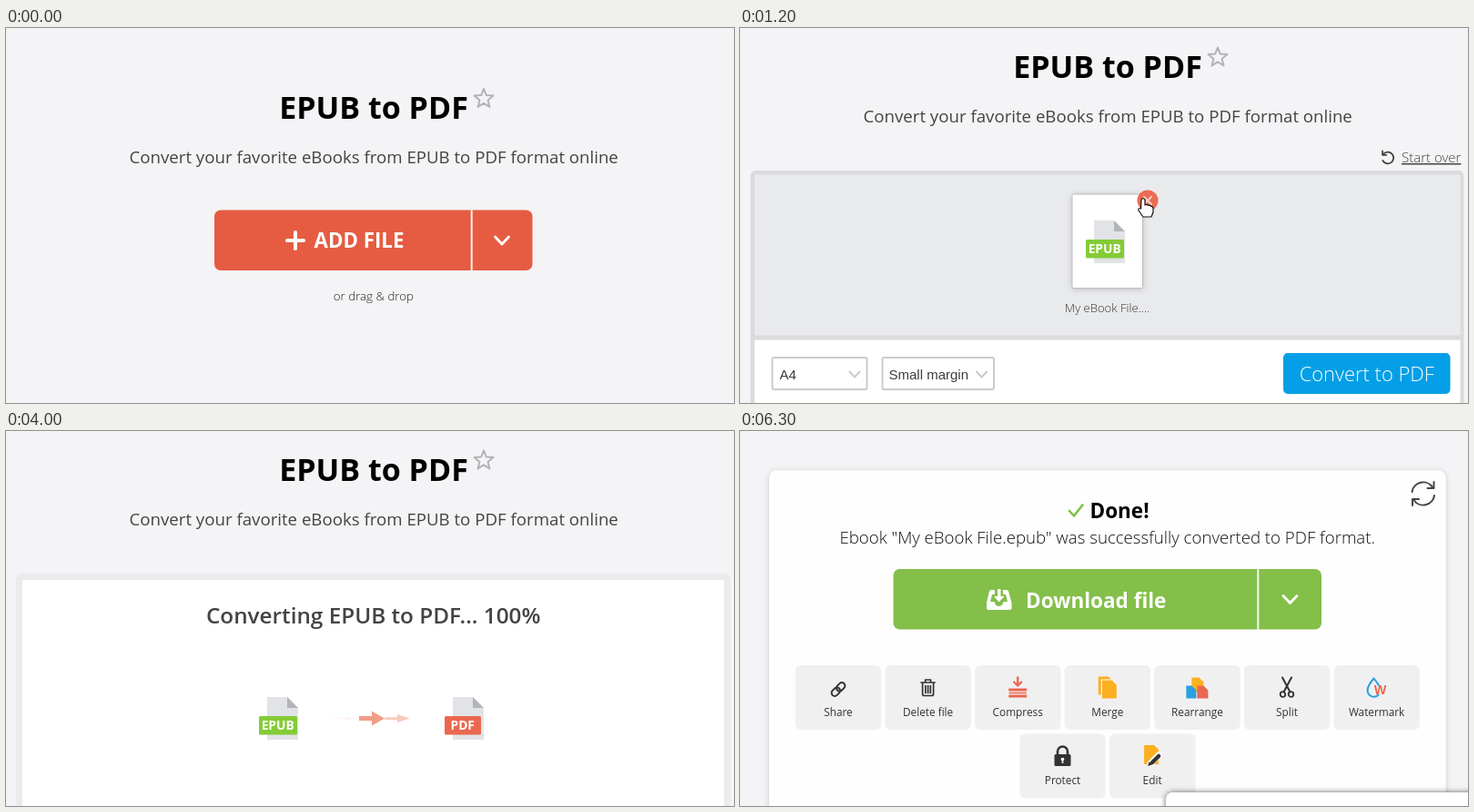
These frames come from a looping animation (800 by 413 pixels, 6500 ms). An HTML page:

```html
<!DOCTYPE html>
<html lang="en">
<head>
<meta charset="utf-8">
<title>EPUB to PDF</title>
<style>
  html, body { margin: 0; width: 100%; height: 100%; overflow: hidden; background: #f4f3f5; }
  svg { display: block; width: 100vw; height: 100vh; }
  text { font-family: "Open Sans", sans-serif; text-anchor: middle; }
  .left { text-anchor: start; }
  .bold { font-weight: 700; }
  .light { font-weight: 300; }
  .ui { font-family: "Liberation Sans", Arial, sans-serif; font-size: 15px; fill: #3c3c3c; text-anchor: start; }
  .line { fill: none; stroke-linecap: round; stroke-linejoin: round; }
  .label { font-size: 11.8px; fill: #333; }
</style>
</head>
<body>
<svg viewBox="0 0 800 413">
  <defs>
    <linearGradient id="ghostFill" x1="0" y1="0" x2="0" y2="1">
      <stop offset="0" stop-color="#a6b4c0"/>
      <stop offset=".5" stop-color="#9eafb8"/>
      <stop offset="1" stop-color="#9badbc"/>
    </linearGradient>
    <filter id="soft" x="-20%" y="-20%" width="140%" height="140%">
      <feDropShadow dx="0" dy="1" stdDeviation="3" flood-opacity=".18"/>
    </filter>
    <filter id="deep" x="-10%" y="-40%" width="120%" height="180%">
      <feDropShadow dx="0" dy="0" stdDeviation="3" flood-opacity=".6"/>
    </filter>
    <filter id="haze" filterUnits="userSpaceOnUse" x="-50" y="-50" width="900" height="560" color-interpolation-filters="sRGB">
      <feGaussianBlur id="blur" stdDeviation="0"/>
    </filter>
    <path id="doc" d="M0 0H22L34 12V47H0Z" fill="#e1e3e6"/>
    <path id="fold" d="M22 0V12H34Z" fill="#b1b5b9"/>
    <path id="chevron" class="line" d="M-7.5 -4L0 4L7.5 -4"/>
    <path id="caret" class="line" d="M-5.5 -3L0 3L5.5 -3"/>
    <g id="epubIcon">
      <use href="#doc" x="9"/><use href="#fold" x="9"/>
      <rect y="21" width="42" height="20.5" rx="1.5" fill="#84cb35"/>
      <text class="bold" x="20.7" y="36.3" font-size="13.8" fill="#fff">EPUB</text>
    </g>
    <g id="pdfIcon">
      <use href="#doc" x="9"/><use href="#fold" x="9"/>
      <rect y="21" width="40" height="20.5" rx="1.5" fill="#eb6850"/>
      <text class="bold" x="19.7" y="36.3" font-size="13.8" fill="#fff">PDF</text>
    </g>
  </defs>

  <rect width="800" height="413" fill="#f4f3f5"/>

  <g id="header">
    <text class="bold" x="404" y="100" font-size="34">EPUB to PDF</text>
    <path id="star" class="line" stroke="#b3b2b6" stroke-width="2"/>
    <text x="404.2" y="149" font-size="18.65" fill="#444">Convert your favorite eBooks from EPUB to PDF format online</text>
  </g>

  <g id="start">
    <rect x="229" y="200.5" width="349.5" height="66.5" rx="7" fill="#e65c42"/>
    <rect x="510.7" y="200.5" width="2" height="66.5" fill="#fbeeea"/>
    <path class="line" d="M309 234H327M318 225V243" stroke="#fff" stroke-width="4"/>
    <text class="bold" x="388" y="242" font-size="22.3" fill="#fff">ADD FILE</text>
    <use href="#chevron" x="545" y="234" stroke="#fff" stroke-width="2.8"/>
    <text class="light" x="403.9" y="300" font-size="13.3" fill="#222">or drag &amp; drop</text>
  </g>

  <g id="overlay">
    <rect width="800" height="413" opacity=".49"/>
    <text class="bold" x="418.3" y="36" font-size="22.5" fill="#fff">Drop the file(s) here</text>
  </g>

  <g id="setup">
    <path class="line" d="M707 139A6.3 6.3 0 1 1 706.3 146M706 135.5V139.8H710.3" stroke="#444" stroke-width="1.8"/>
    <text class="light" x="759.7" y="148" font-size="15" fill="#444" text-decoration="underline">Start over</text>
    <rect x="11.5" y="157" width="784" height="300" rx="6" fill="#dbdbdd"/>
    <rect x="16" y="161.5" width="775.5" height="177" rx="2" fill="#e9eaec"/>
    <rect x="16" y="343.5" width="775.5" height="90" fill="#fff"/>
    <rect x="365" y="183" width="77.5" height="103.5" rx="1" fill="#fff" stroke="#bcbcc2" filter="url(#soft)"/>
    <use href="#epubIcon" x="380" y="212"/>
    <text class="light" x="403.5" y="312.5" font-size="13.1" fill="#333">My eBook File....</text>
    <g id="remove">
      <circle cx="448" cy="190" r="11.5" fill="#ec6b53"/>
      <path class="line" d="M444 186L452 194M452 186L444 194" stroke="#fbd5cc" stroke-width="1.8"/>
    </g>
    <g fill="#fff" stroke="#c9cbd1" stroke-width="2">
      <rect x="35.5" y="363" width="104" height="35" rx="2"/>
      <rect x="156.5" y="363" width="122.5" height="35" rx="2"/>
      <use href="#caret" x="126" y="381.5"/>
      <use href="#caret" x="265.5" y="381.5"/>
    </g>
    <text class="ui" x="43.5" y="387">A4</text>
    <text class="ui" x="163.5" y="387">Small margin</text>
    <rect id="convert" x="597" y="358" width="183.5" height="45" rx="5"/>
    <text class="light" x="688.7" y="388.5" font-size="21.9" fill="#fff">Convert to PDF</text>
  </g>

  <g id="working">
    <rect x="11" y="157" width="785.5" height="300" rx="6" fill="#ebebee"/>
    <rect x="18" y="164" width="771" height="260" fill="#fff"/>
    <text id="status" x="403.7" y="212" font-size="24.3" font-weight="600" fill="#434345"></text>
    <use href="#epubIcon" x="278" y="293"/>
    <use href="#pdfIcon" x="482" y="293"/>
    <g id="arrows" fill="#f0937b"></g>
  </g>

  <g id="done">
    <rect x="32" y="43.5" width="743.5" height="400" rx="8" fill="#fefefe" filter="url(#soft)"/>
    <path class="line" d="M738.5 67A12.3 12.3 0 0 1 761 62M763 71A12.3 12.3 0 0 1 740.5 76M762.5 56V63H755.5M739 82V75H746" stroke="#444" stroke-width="2"/>
    <path class="line" d="M362 88L367 93.5L376.5 81.5" stroke="#7cc142" stroke-width="2.6"/>
    <text class="bold left" x="384.5" y="96" font-size="22.5">Done!</text>
    <text class="light" x="403.7" y="124" font-size="18.65" fill="#111">Ebook "My eBook File.epub" was successfully converted to PDF format.</text>
    <rect x="168.5" y="152" width="470.5" height="66.5" rx="7" fill="#83bf49"/>
    <rect x="568.3" y="152" width="2" height="66.5" fill="#f2f8ec"/>
    <path d="M276 175H280V180H277L275 188H279.5Q280.5 193 284.5 193T289.5 188H294L292 180H289V175H293Q294.5 175 295 176.5L298.5 189V195Q298.5 197 296.5 197H273Q271 197 271 195V189L274 176.5Q274.5 175 276 175Z" fill="#fff"/>
    <path d="M283 174H286.5V182H290.5L284.7 188.5L279 182H283Z" fill="#fff"/>
    <text class="bold left" x="314" y="195" font-size="22.5" fill="#fff">Download file</text>
    <use href="#chevron" x="604.5" y="185.5" stroke="#fff" stroke-width="2.8"/>
    <g id="tiles"></g>
  </g>
  <rect id="sheet" x="468" width="360" height="60" rx="8" fill="#fff" filter="url(#deep)"/>

  <g id="ghost">
    <rect x="-29" y="-85" width="97" height="97" rx="2" fill="#222" opacity=".25"/>
    <rect x="-30" y="-87" width="96" height="96.5" rx="2" fill="url(#ghostFill)" stroke="#b5c2ca" opacity=".82"/>
    <rect x="29" y="12" width="51" height="17" fill="#fff" stroke="#d0d0d6" stroke-width=".6"/>
    <path class="line" d="M32 20.5H41M37 16.5L41 20.5L37 24.5" stroke="#2a4fa8" stroke-width="1.3"/>
    <text class="left" x="46.5" y="24.7" font-size="11" fill="#26367c">Move</text>
  </g>
  <path id="pointer" d="M0 0V15.5L3.6 12.2L6.2 18L8.7 16.9L6.2 11.2H11Z" fill="#fff" stroke="#111" stroke-linejoin="round"/>
  <path id="hand" d="M-2 0Q0 -2.5 2 0V6Q4 4.5 5.5 6.5Q7.5 5.5 8.5 7.5Q10.5 7 11 9.5V14L9 19H0L-5 12Q-6 9 -2.5 10Z" fill="#fff" stroke="#111" stroke-width="1.2" stroke-linejoin="round"/>
</svg>

<script>
const LOOP = 6500, STEP = 100;
// Start of each scene, in ms.
const DRAG = 700, SETUP = 1200, WORK = 2600, COMPLETE = 4000, DONE = 5100;

const $ = id => document.getElementById(id);
const show = (id, on) => { $(id).style.display = on ? '' : 'none'; };
const place = (id, x, y) => $(id).setAttribute('transform', `translate(${x} ${y})`);
const smooth = k => k * k * (3 - 2 * k);

// Value at x in a table of [x, value] rows.
function along(rows, x, ease = k => k) {
  if (x <= rows[0][0]) return rows[0][1];
  for (let i = 1; i < rows.length; i++) {
    const [x0, a] = rows[i - 1], [x1, b] = rows[i];
    if (x <= x1) return a + (b - a) * ease((x - x0) / (x1 - x0));
  }
  return rows[rows.length - 1][1];
}

const cursorX = [[DRAG, 666], [1100, 443], [SETUP, 443], [2000, 686], [2300, 682]];
const cursorY = [[DRAG, 187], [1100, 189], [SETUP, 189], [2000, 369], [2300, 387]];
const blurSize = [[DONE, 7], [5500, 0]];
const sheetTop = [[5200, 420], [5500, 398]];
const pulse = [[-.4, 0], [-.2, .55], [0, 1], [.2, .15], [.4, .05], [.5, 0]];

const star = Array.from({ length: 10 }, (_, i) => {
  const r = i % 2 ? 4.8 : 11, a = i * Math.PI / 5;
  return `${525 + r * Math.sin(a)} ${78 - r * Math.cos(a)}`;
});
$('star').setAttribute('d', `M${star.join('L')}Z`);

// Icons are drawn around 0,0.
const stroke = (d, color = '#333', w = 2) =>
  `<path class="line" d="${d}" stroke="${color}" stroke-width="${w}"/>`;
const page = (x, y, w, h, color) =>
  `<path d="M${x} ${y}h${w - 5}l5 5v${h - 5}h${-w}Z" fill="${color}"/>`;
const YELLOW = '#fbb01f', RED = '#eb6850', BLUE = '#2aa0e0';

const tools = [
  ['Share', `<g transform="translate(0 2) rotate(-45)" class="line" stroke="#333" stroke-width="2">
    <rect x="-9" y="-3.5" width="10.5" height="7" rx="3.5"/><rect x="-1.5" y="-3.5" width="10.5" height="7" rx="3.5"/></g>`],
  ['Delete file', stroke('M-7.5 -5.5H7.5M-3 -6V-8.5H3V-6M-6 -5V7Q-6 9 -4 9H4Q6 9 6 7V-5M-2.7 -2V6M0 -2V6M2.7 -2V6', '#333', 1.7)],
  ['Compress', stroke('M0 -11V-3M-4 -6L0 -2L4 -6', RED, 2.4) +
    `<path d="M-10 1H10V4H-10ZM-10 8H10V11H-10Z" fill="${RED}"/>` + stroke('M-9 6H9', RED, 1.5)],
  ['Merge', page(-10, -12, 16, 20, YELLOW) + page(-7, -9, 17, 20, '#fff') + page(-6, -8, 16, 20, YELLOW)],
  ['Rearrange', page(-6, -11, 13, 16, YELLOW) + page(-12, -2, 11, 14, BLUE) + page(0, -2, 12, 14, RED)],
  ['Split', stroke('M-5 -11L3.5 5M5 -11L-3.5 5') +
    '<g class="line" stroke="#333" stroke-width="1.8"><circle cx="-4.5" cy="7.5" r="2.8"/><circle cx="4.5" cy="7.5" r="2.8"/></g>'],
  ['Watermark', stroke('M-3 -10Q-10 -2 -10 3A7 7 0 0 0 2 8M-3 -10Q1 -5 2.5 -2', BLUE) +
    `<text class="bold" x="4" y="7" font-size="14" fill="${RED}">W</text>`],
  ['Protect', stroke('M-5.5 -1V-5A5.5 5.5 0 0 1 5.5 -5V-1', '#333', 2.6) +
    '<rect x="-9" y="-2" width="18" height="13" rx="1.5" fill="#333"/><circle cy="3.5" r="1.8" fill="#fff"/><path d="M-.8 4H.8V8H-.8Z" fill="#fff"/>'],
  ['Edit', page(-9, -12, 16, 21, YELLOW) + stroke('M-2 8L7 -1', '#fff', 7) +
    stroke('M0 7L7 0', '#333', 4.5) + '<path d="M-5 11L-3.5 6L0 9.5Z" fill="#333"/>']
];
$('tiles').innerHTML = tools.map(([name, icon], i) => {
  const low = i > 6;
  const x = (low ? 307.3 + (i - 7) * 98.6 : 60.8 + i * 98.6), y = low ? 333.5 : 258;
  return `<g transform="translate(${x} ${y})">
    <rect width="94.5" height="71" rx="6" fill="#f0f0f1"/>
    <g transform="translate(47.2 24.5)">${icon}</g>
    <text class="label" x="47.2" y="55.7">${name}</text></g>`;
}).join('');

$('arrows').innerHTML = '<path d="M-14 -2.5H0V-8L14 0L0 8V2.5H-14Z"/>'.repeat(3);

// Three arrows swell one after another, once a second.
function drawArrows(t) {
  [...$('arrows').children].forEach((arrow, i) => {
    const turn = (t - 800) / 1000 - i * .2;
    const level = along(pulse, turn - Math.round(turn));
    arrow.setAttribute('transform', `translate(${374 + 28 * i} 316.5) scale(1 ${Math.max(level, .05)})`);
    arrow.setAttribute('opacity', level * .9);
  });
}

function draw(t) {
  const within = (a, b) => t >= a && t < b;
  const setup = within(SETUP, WORK), working = within(WORK, DONE);
  const dragging = within(DRAG, SETUP);

  show('header', t < DONE);
  place('header', 0, t < SETUP ? 0 : -45.5);
  show('start', t < SETUP);
  show('overlay', dragging);
  show('setup', setup);
  show('working', working);
  show('done', t >= DONE);
  show('sheet', t > 5200);

  const x = along(cursorX, t, smooth), y = along(cursorY, t, smooth);
  const onRemove = setup && Math.hypot(x - 448, y - 190) < 13;
  const onConvert = setup && x > 597 && y > 358;
  const hand = onRemove || onConvert;
  show('remove', onRemove);
  $('convert').setAttribute('fill', onConvert && t >= 2100 ? '#0590d2' : '#049fe6');

  show('ghost', dragging);
  show('hand', hand);
  show('pointer', within(DRAG, 2900) && !hand);
  for (const id of ['ghost', 'hand', 'pointer']) place(id, x, y);

  if (working) {
    $('status').textContent = 'Converting EPUB to PDF...' + (t < COMPLETE ? '' : ' 100%');
    drawArrows(t);
  }

  const blur = along(blurSize, t);
  $('blur').setAttribute('stdDeviation', blur);
  if (blur > 0) $('done').setAttribute('filter', 'url(#haze)');
  else $('done').removeAttribute('filter');
  $('sheet').setAttribute('y', along(sheetTop, t));
}

const begin = performance.now();
function tick() {
  const t = (performance.now() - begin) % LOOP;
  draw(Math.floor(t / STEP) * STEP);
  requestAnimationFrame(tick);
}
tick();
</script>
</body>
</html>
```
